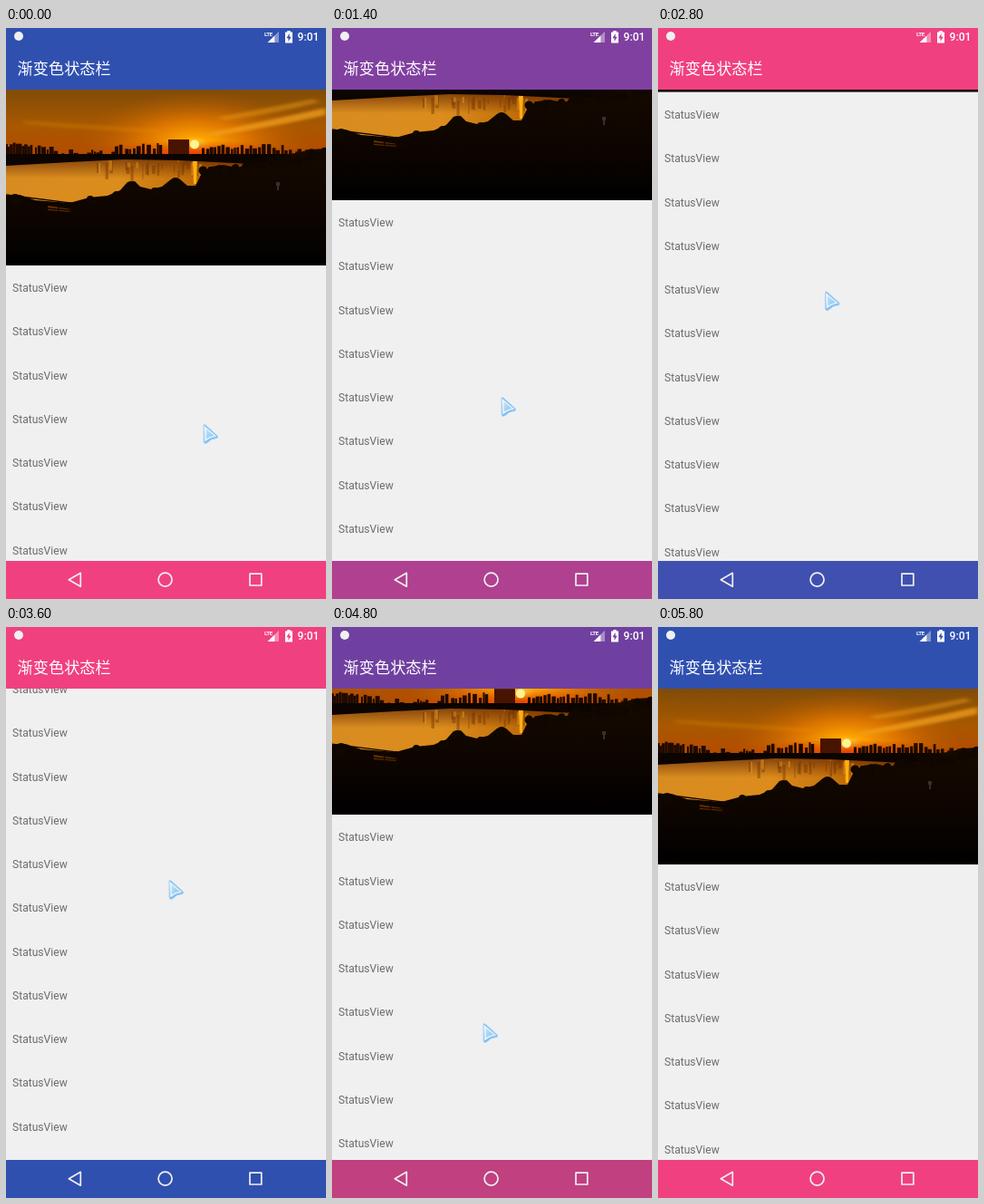
Write an HTML page that moves like this. It is 353 px wide and 630 px high and loops after 6400 ms.

```html
<!DOCTYPE html>
<html lang="zh">
<head>
<meta charset="utf-8">
<style>
  html, body { margin: 0; width: 100%; height: 100%; overflow: hidden; background: #f0f0f0; }
  svg { display: block; width: 353px; height: 630px; }
  text { font-family: Roboto, "Noto Sans", sans-serif; }
  .title { font-family: "Noto Sans CJK SC", "Noto Sans CJK", sans-serif; font-size: 17.2px; }
</style>
</head>
<body>
<svg viewBox="0 0 353 630">
  <defs>
    <linearGradient id="sky" x2="0" y2="1">
      <stop offset="0" stop-color="#804c08"/>
      <stop offset=".5" stop-color="#a85800"/>
      <stop offset="1" stop-color="#b84800"/>
    </linearGradient>
    <radialGradient id="glow" gradientUnits="userSpaceOnUse" cx="0" cy="0" r="1"
      gradientTransform="translate(208 60) scale(130 58)">
      <stop offset="0" stop-color="#ffe050"/>
      <stop offset=".13" stop-color="#ffa400"/>
      <stop offset=".45" stop-color="#e87c00" stop-opacity=".8"/>
      <stop offset="1" stop-color="#b05800" stop-opacity="0"/>
    </radialGradient>
    <radialGradient id="ember" gradientUnits="userSpaceOnUse" cx="0" cy="0" r="1"
      gradientTransform="translate(208 70) scale(120 14)">
      <stop offset="0" stop-color="#e83800" stop-opacity=".9"/>
      <stop offset="1" stop-color="#c83000" stop-opacity="0"/>
    </radialGradient>
    <linearGradient id="water">
      <stop offset="0" stop-color="#d88c20"/>
      <stop offset=".35" stop-color="#dc8c1c"/>
      <stop offset=".65" stop-color="#b86404"/>
      <stop offset="1" stop-color="#804000"/>
    </linearGradient>
    <linearGradient id="shade" x2="0" y2="1">
      <stop offset="0" stop-color="#501800" stop-opacity=".6"/>
      <stop offset=".35" stop-color="#501800" stop-opacity="0"/>
    </linearGradient>
    <linearGradient id="land" x2="0" y2="1">
      <stop offset="0" stop-color="#160a00"/>
      <stop offset=".6" stop-color="#0c0400"/>
      <stop offset="1" stop-color="#000"/>
    </linearGradient>
    <linearGradient id="glass" x2="1" y2="1">
      <stop offset="0" stop-color="#c8e4f8"/>
      <stop offset="1" stop-color="#80c4f0"/>
    </linearGradient>
    <filter id="soft" x="-20%" y="-100%" width="140%" height="300%"><feGaussianBlur stdDeviation="3 1.5"/></filter>
    <clipPath id="frame"><path d="M0 0H353V194H0Z"/></clipPath>
  </defs>

  <rect width="353" height="630" fill="#f0f0f0"/>
  <g id="content">
    <g transform="translate(0 68)" clip-path="url(#frame)">
      <rect width="353" height="80" fill="url(#sky)"/>
      <rect width="353" height="80" fill="url(#glow)"/>
      <g fill="#f0a018" filter="url(#soft)">
        <path d="M222 48Q280 36 353 20V28Q290 42 224 52Z" opacity=".75"/>
        <path d="M235 30Q290 20 340 10L345 14Q290 28 238 34Z" opacity=".45"/>
        <path d="M20 34Q90 38 170 44L168 48Q80 44 20 38Z" opacity=".2"/>
      </g>
      <rect y="54" width="353" height="26" fill="url(#ember)"/>
      <circle cx="208" cy="60.5" r="5" fill="#fff490"/>
      <rect y="77" width="353" height="60" fill="url(#water)"/>
      <rect y="77" width="353" height="60" fill="url(#shade)"/>
      <g id="ripples"></g>
      <path d="M206 77H211L210 104H207Z" fill="#ffb010"/>
      <g id="skyline" fill="#200a00"></g>
      <path d="M0 71H353V82H270L190 78 130 77 70 80 0 84Z" fill="#0c0400"/>
      <path d="M0 117 15 116 32 122 70 125 92 119 112 117 126 111 134 102 142 101 148 107 160 110
        172 107 182 99 192 99 200 106 209 106 216 92 226 85 240 83 254 86 272 82 290 80 302 72
        320 70 336 66 353 65V194H0Z" fill="url(#land)"/>
      <g id="shrubs" fill="#100700"></g>
      <path d="M46 128 72 132V135L46 133Z" fill="#603000"/>
      <path d="M0 116 72 125 84 137M30 122V136M44 124V138M58 124V140M71 124V140M0 127 80 134"
        fill="none" stroke="#100600" stroke-width="1.3"/>
      <path d="M298 102H302V106H301V111H299V106H298Z" fill="#383028"/>
    </g>
    <g id="rows" font-size="12.1" fill="#6c6c6c"></g>
  </g>

  <rect id="header" width="353" height="68"/>
  <rect id="footer" y="588" width="353" height="42"/>

  <g fill="#fff">
    <circle cx="14" cy="9" r="5" fill="#f0f0f0"/>
    <text class="title" x="12.6" y="50.5">渐变色状态栏</text>
    <text x="285" y="9" font-size="6.2" font-weight="700" letter-spacing="-.4">LTE</text>
    <path d="M288.5 16 296.5 8.2V16Z"/>
    <path d="M296.5 8.2 301 3.8V16H296.5Z" opacity=".4"/>
    <path d="M308 4.6H310.3V3H313.7V4.6H316V16.5H308Z"/>
    <path id="bolt" d="M312.6 6 309.4 11.2H311.5V15L314.6 9.8H312.6Z"/>
    <text x="321.6" y="14.3" font-size="12.1" font-weight="500">9:01</text>
  </g>
  <g fill="none" stroke="#f0f0f0" stroke-width="1.7" stroke-linejoin="round">
    <path d="M69.3 608.7 82.3 601.3V616.2Z"/>
    <circle cx="175.6" cy="608.6" r="7.5"/>
    <rect x="269" y="602.2" width="12.8" height="12.8"/>
  </g>

  <g id="cursor" stroke-linejoin="round">
    <path d="M1 1.5Q1.6 0 3 1L16.4 13Q17.6 15 15 15.6 9 16 5 20.6 2 22.4 1.2 20Z"
      fill="#78bcf0" stroke="#a8d0f4" stroke-width="1"/>
    <path d="M1.6 2 15 13.4Q8 14 2.6 19Z" fill="#f4faff" stroke="#d0e4f8" stroke-width=".8"/>
    <path d="M3.4 5 12.4 12.8Q7.6 13.4 3.8 16.4Z" fill="url(#glass)"/>
  </g>
</svg>
<script>
const LOOP = 6400, STEP = 200, FADE_RANGE = 198, ROW_PITCH = 48.25;
const BLUE = [63, 81, 181], PINK = [255, 64, 129];

// [ms, list offset]
const SCROLL = [[200, 0], [400, 12], [600, 12], [800, 22], [1400, 72], [2200, 140.6], [3000, 208],
  [3400, 228], [3600, 218], [4400, 102.6], [4800, 54.9], [5200, 11], [5400, 0]];
// [ms, x, y]
const POINTER = [[0, 217, 437], [200, 203, 476], [400, 190, 467], [600, 190, 467], [1400, 186, 407],
  [2200, 188, 339], [3000, 182, 274], [3400, 180, 267], [3600, 179, 279], [4400, 172, 391],
  [4800, 166, 437], [5400, 157, 506], [5600, 260, 529]];

const $ = id => document.getElementById(id);

function add(parent, tag, attrs, label) {
  const node = document.createElementNS(parent.namespaceURI, tag);
  for (const key in attrs) node.setAttribute(key, attrs[key]);
  if (label) node.textContent = label;
  parent.append(node);
}

let seed = 11;
function random(min, max) {
  seed = (seed * 16807) % 2147483647;
  return min + (max - min) * seed / 2147483647;
}

function sample(keys, t, column = 1) {
  const next = keys.findIndex(key => key[0] > t);
  if (next === 0) return keys[0][column];
  if (next < 0) return keys[keys.length - 1][column];
  const a = keys[next - 1], b = keys[next];
  return a[column] + (b[column] - a[column]) * (t - a[0]) / (b[0] - a[0]);
}

// Colours are reduced to 16 levels per channel.
function blend(from, to, amount) {
  return `rgb(${from.map((v, i) => Math.floor(v + (to[i] - v) * amount) & 0xf0)})`;
}

function buildings(from, to, top, gap) {
  for (let x = from; x < to;) {
    const width = random(2, 5), y = random(top, top + 7);
    add($("skyline"), "rect", { x, y, width, height: 74 - y });
    x += width + random(0, gap);
  }
}

buildings(0, 28, 57, 0);
buildings(32, 54, 61, 1);
buildings(56, 120, 66, 1);
buildings(120, 172, 59, 3);
add($("skyline"), "rect", { x: 179, y: 55, width: 23, height: 18, fill: "#481400" });
buildings(216, 312, 60, 2);
buildings(312, 350, 65, 0);

for (let i = 0; i < 30; i++) {
  add($("ripples"), "rect", { x: random(100, 215), y: random(78, 84), width: random(1, 4),
    height: random(4, 18), fill: i % 3 ? "#703404" : "#f09c20", opacity: .45 });
}
for (let i = 0; i < 50; i++) {
  const x = random(215, 353);
  add($("shrubs"), "circle", { cx: x, cy: 94 - (x - 215) * .17 + random(-5, 4), r: random(2, 5) });
}
for (const [cx, cy, r] of [[138, 107, 6], [187, 104, 7], [122, 117, 5], [164, 112, 4], [10, 122, 7], [93, 121, 4]]) {
  add($("shrubs"), "circle", { cx, cy, r });
}
for (let i = 0; i < 13; i++) {
  add($("rows"), "text", { x: 7, y: 291.2 + i * ROW_PITCH }, "StatusView");
}

function draw(now) {
  const t = Math.floor(now % LOOP / STEP) * STEP;
  const offset = sample(SCROLL, t);
  const amount = Math.min(1, offset / FADE_RANGE);
  const top = blend(BLUE, PINK, amount);
  $("content").setAttribute("transform", `translate(0 ${-offset})`);
  $("header").setAttribute("fill", top);
  $("bolt").setAttribute("fill", top);
  $("footer").setAttribute("fill", blend(PINK, BLUE, amount));
  $("cursor").setAttribute("transform", `translate(${sample(POINTER, t)} ${sample(POINTER, t, 2)})`);
  $("cursor").setAttribute("visibility", t < 5800 ? "visible" : "hidden");
}

const start = performance.now();
function tick() {
  draw(performance.now() - start);
  requestAnimationFrame(tick);
}
tick();
</script>
</body>
</html>
```
